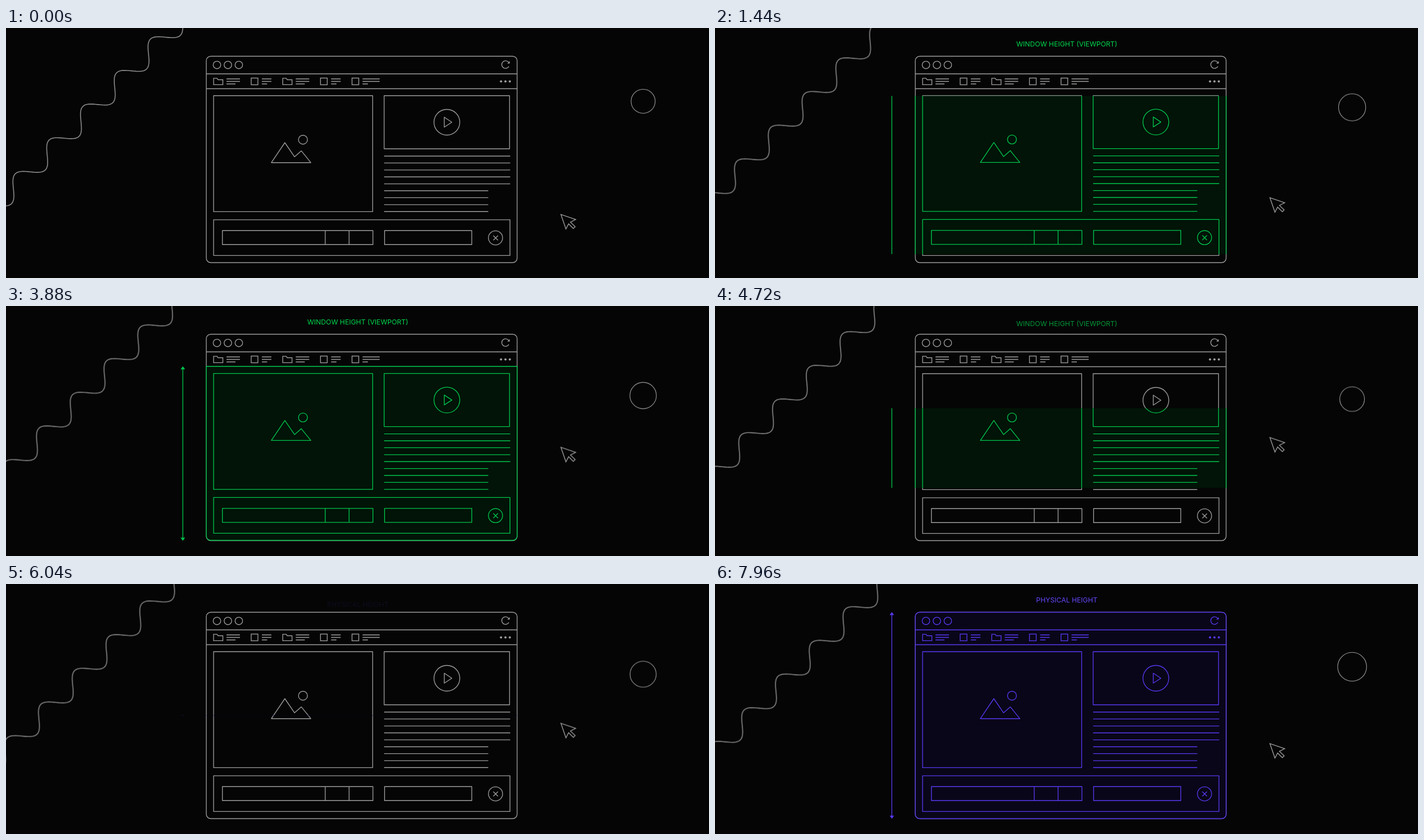
Animation of 1253 by 447 pixels, one loop 8000 ms. Source, as an HTML page:

```html
<!DOCTYPE html>
<html lang="en">
<head>
<meta charset="utf-8">
<title>Window height</title>
<style>
  html, body { margin: 0; width: 100%; height: 100%; overflow: hidden; background: #050505; }
  svg { position: absolute; left: 0; top: 0; width: 1253px; height: 447px; fill: none; stroke: currentColor; stroke-width: 1.35; }
  text { font: 12.2px Inter, sans-serif; text-anchor: middle; fill: currentColor; stroke: none; }
  .gray { color: #9e9e9e; }
  .green { color: #00c44c; }
  .purple { color: #5638ee; }
  .green text { color: #00d84f; }
  .purple text { color: #6747ff; }
  .dots { fill: currentColor; stroke: none; }

  #wave { stroke: #8e8e8e; stroke-width: 1.6; animation: wave 8s linear infinite; }
  #cursor { animation: cursor 8s linear infinite; }
  #ball { stroke-width: 1.1; animation: drift 8s linear infinite, swell 8s linear infinite; }
  .green .reveal, .purple .reveal { animation: 8s cubic-bezier(.65, 0, .35, 1) infinite; }
  .green .reveal { animation-name: viewport; }
  .purple .reveal { animation-name: physical; }
  .green text { animation: label-in-out 8s linear infinite; }
  .purple text { animation: label-in 8s linear infinite; }

  @keyframes wave { to { transform: translate(458.9px, -458.9px); } }
  @keyframes cursor {
    62.5% { transform: translateY(-104px); }
    100% { transform: translateY(-47.3px); }
  }
  @keyframes drift {
    0% { transform: translateY(0); }
    62.5% { transform: translateY(37.5px); }
    100% { transform: translateY(16.7px); }
  }
  @keyframes swell {
    0%, 62.5% { r: 21.5px; }
    31.25%, 96.25% { r: 26.2px; }
    100% { r: 25.7px; }
  }
  @keyframes viewport {
    0%, 12.75%, 62.625%, 100% { clip-path: inset(245px 0 202px); }
    20.25%, 55.125% { clip-path: inset(106px 0 23px); }
  }
  @keyframes physical {
    0%, 75.25% { clip-path: inset(235px 0 212px); }
    82.75%, 100% { clip-path: inset(48px 0 25px); }
  }
  @keyframes label-in-out {
    0%, 12.5%, 62.5%, 100% { opacity: 0; transform: translateY(10px); }
    17.5%, 57.5% { opacity: 1; transform: none; }
  }
  @keyframes label-in {
    0%, 75% { opacity: 0; transform: translateY(10px); }
    80%, 100% { opacity: 1; transform: none; }
  }
</style>
</head>
<body>
<svg class="gray">
  <defs>
    <path id="folder" d="M0 11.5V0H6L8 2.7H16.5V11.5Z"/>
    <rect id="tab" width="12" height="12"/>
    <path id="head" d="M0 0L4 5.5H-4Z"/>

    <g id="bar">
      <path d="M357 82H911M357 108.5H911"/>
      <circle cx="376" cy="66" r="6.7"/>
      <circle cx="395.5" cy="66" r="6.7"/>
      <circle cx="415" cy="66" r="6.7"/>
      <path d="M896.3 68.7A6.8 6.8 0 1 1 895.6 61"/>
      <path class="dots" d="M897.8 59.3V63.6H893.4Z"/>
      <use href="#folder" x="370" y="89.8"/>
      <use href="#tab" x="437" y="89.5"/>
      <use href="#folder" x="493.3" y="89.8"/>
      <use href="#tab" x="560.5" y="89.5"/>
      <use href="#tab" x="616.7" y="89.5"/>
      <path d="M393 91h24m-24 4.5h24m-24 4.5h16M456 91h17m-17 4.5h17m-17 4.5h9.5
        M516.5 91h24m-24 4.5h24m-24 4.5h16M579.5 91h17m-17 4.5h17m-17 4.5h9.5
        M635.5 91h30.5m-30.5 4.5h30.5m-30.5 4.5h9.5"/>
      <g class="dots">
        <circle cx="882.3" cy="95.5" r="2"/>
        <circle cx="890.2" cy="95.5" r="2"/>
        <circle cx="898" cy="95.5" r="2"/>
      </g>
    </g>

    <g id="page" stroke-linejoin="round">
      <rect x="370" y="121" width="283.5" height="207.3"/>
      <path d="M473 240.7L497 205L514.3 230.3L526.3 219.7L543.3 240.7Z"/>
      <circle cx="529.3" cy="199.7" r="8"/>
      <rect x="674" y="121" width="223.5" height="95"/>
      <circle cx="785.8" cy="168.5" r="23"/>
      <path d="M781.2 159.5L794.7 168.5L781.2 177.3Z"/>
      <path d="M674 229h224.7M674 241.4h224.7M674 253.8h224.7M674 266.2h224.7M674 278.6h224.7
        M674 291h185.5M674 303.4h185.5M674 315.8h185.5M674 328.2h185.5"/>
      <rect x="370" y="342.8" width="528.3" height="63.9"/>
      <path d="M385.7 362.2H654V387.2H385.7ZM569 362.2v25M611.5 362.2v25"/>
      <rect x="674.7" y="362.2" width="155.5" height="25"/>
      <circle cx="872.5" cy="375.2" r="12.6"/>
      <path d="M868.5 371.2l8.4 8.4m0-8.4l-8.4 8.4"/>
    </g>
  </defs>

  <path id="wave"/>
  <rect x="357" y="50.5" width="554" height="369" rx="8"/>
  <use href="#bar"/>
  <use href="#page"/>
  <circle id="ball" cx="1135.6" cy="131" r="21.5"/>
  <path id="cursor" d="M989 333.3l26.4 9-9.4 4.9 8.5 8.1-3.3 3.3-8.4-8.4-4.8 9Z"/>
</svg>

<div class="green">
  <svg class="reveal">
    <path fill="#011407" d="M357 108H911V411a8 8 0 0 1-8 8H365a8 8 0 0 1-8-8Z"/>
    <use href="#page" y="-.4"/>
    <path d="M315.2 110V417"/>
    <use class="dots" href="#head" x="315.2" y="107.7"/>
    <use class="dots" href="#head" transform="translate(315.2 419.7) scale(1 -1)"/>
  </svg>
  <svg><text x="627" y="32.5">WINDOW HEIGHT (VIEWPORT)</text></svg>
</div>

<div class="purple">
  <svg class="reveal">
    <rect fill="#0a0619" x="357" y="50.5" width="554" height="369" rx="8"/>
    <use href="#bar"/>
    <use href="#page"/>
    <path d="M315.2 53V417"/>
    <use class="dots" href="#head" x="315.2" y="50"/>
    <use class="dots" href="#head" transform="translate(315.2 419.7) scale(1 -1)"/>
  </svg>
  <svg><text x="627" y="32.5">PHYSICAL HEIGHT</text></svg>
</div>

<script>
  // Sine wave laid along the falling diagonal, long enough to slide for a whole loop.
  const step = 60.2, swing = 11.7, parts = 32;
  const points = [];
  for (let i = -14 * parts; i <= 2 * parts; i++) {
    const along = step * i / parts;
    const off = -swing * Math.cos(2 * Math.PI * i / parts);
    points.push((269 + along + off).toFixed(2) + " " + (31.5 - along + off).toFixed(2));
  }
  document.getElementById("wave").setAttribute("d", "M" + points.join("L"));
</script>
</body>
</html>
```
